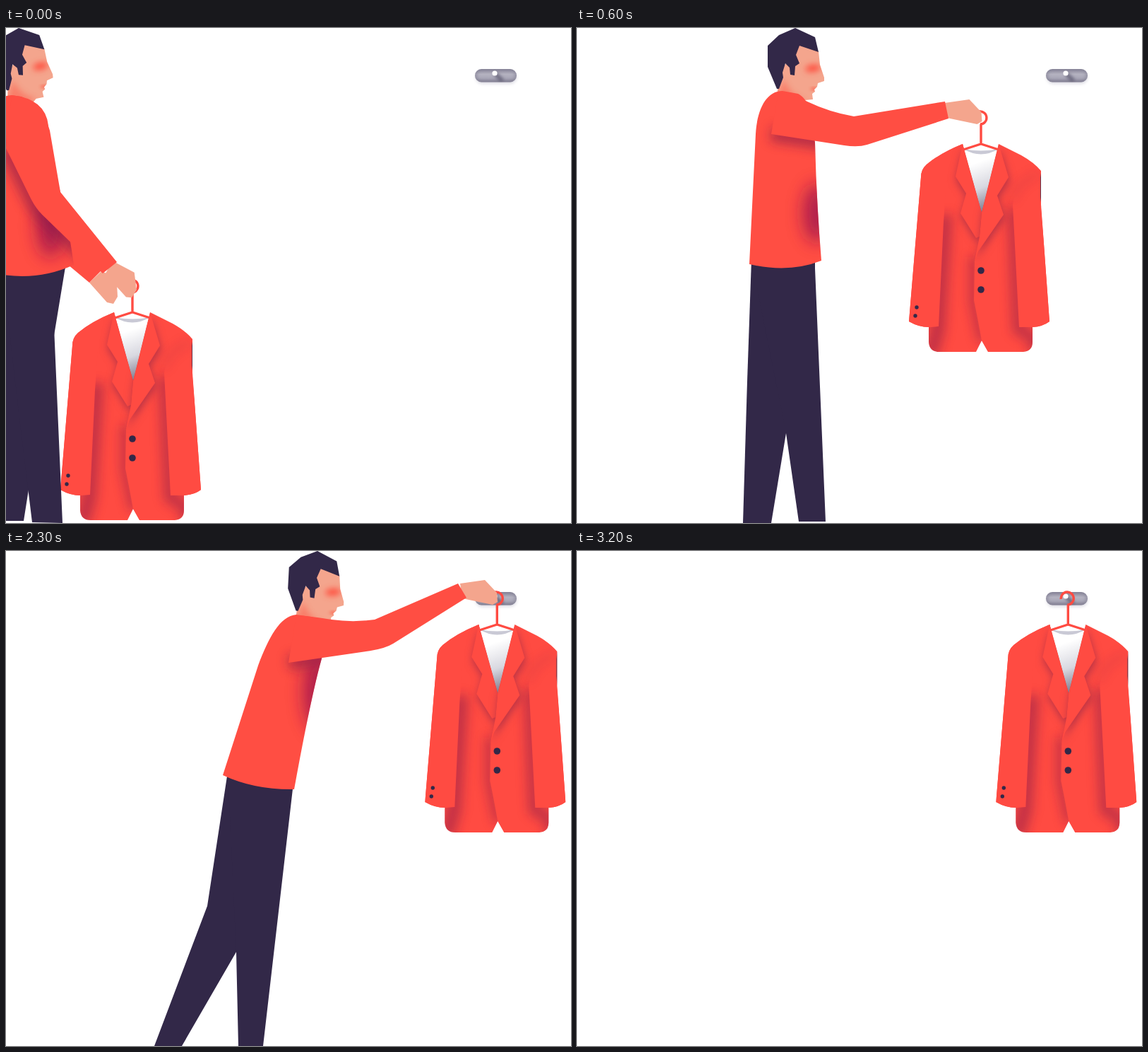
Recreate the animation shown at these times as an HTML page. Size 800 by 700 pixels, loop 5.2 s.

```html
<!DOCTYPE html>
<html lang="en">
<head>
<meta charset="utf-8">
<title>Hanging up a jacket</title>
<style>
  html, body { margin: 0; height: 100%; overflow: hidden; background: #fff; }
  svg { display: block; width: 100vw; height: 100vh; }
  .red { fill: #ff4e43; }
  .coat { fill: #ff4b42; }
  .dark { fill: #322848; }
  .skin { fill: #f4a58d; }
  .shade { fill: none; stroke: #8c1a4a; filter: url(#blur8); }
  .lapel { fill: #ff4b42; filter: drop-shadow(1px 5px 6px #6b1a4a80); }
</style>
</head>
<body>
<svg viewBox="0 0 800 700">
  <defs>
    <filter id="blur2" x="-50%" y="-50%" width="200%" height="200%"><feGaussianBlur stdDeviation="2"/></filter>
    <filter id="blur4" x="-100%" y="-100%" width="300%" height="300%"><feGaussianBlur stdDeviation="4"/></filter>
    <filter id="blur8" filterUnits="userSpaceOnUse" x="-200" y="-100" width="1100" height="900"><feGaussianBlur stdDeviation="8"/></filter>
    <filter id="blur12" x="-100%" y="-100%" width="300%" height="300%"><feGaussianBlur stdDeviation="12"/></filter>
    <linearGradient id="lining" x1="0.35" y1="0" x2="0.55" y2="1">
      <stop offset="0.2" stop-color="#fff"/>
      <stop offset="0.6" stop-color="#d8d8e0"/>
      <stop offset="1" stop-color="#777488"/>
    </linearGradient>
    <linearGradient id="metal" x2="0" y2="1">
      <stop offset="0" stop-color="#8f8c9f"/>
      <stop offset="0.4" stop-color="#b4b2c0"/>
      <stop offset="0.7" stop-color="#aaa8b8"/>
      <stop offset="1" stop-color="#8b889b"/>
    </linearGradient>
    <clipPath id="coatClip"><use href="#coatShape"/></clipPath>
    <clipPath id="torsoClip"><path id="torsoEdge"/></clipPath>
    <clipPath id="faceClip"><use href="#face"/></clipPath>
    <clipPath id="pegClip"><use href="#pegShape"/></clipPath>
  </defs>

  <g id="peg">
    <rect x="665" y="61" width="58" height="18" rx="9" fill="#aaa8bb" opacity=".4" filter="url(#blur2)"/>
    <rect id="pegShape" x="664" y="58" width="59" height="18.5" rx="9.2" fill="url(#metal)"/>
    <g clip-path="url(#pegClip)">
      <rect x="664" y="58" width="59" height="18.5" rx="9.2" fill="none" stroke="#777489" stroke-width="4" opacity=".6" filter="url(#blur2)"/>
      <path d="M693 65l10 10" stroke="#5f5b72" stroke-width="6" opacity=".8" filter="url(#blur2)"/>
    </g>
    <circle cx="692" cy="64" r="3.6" fill="#fff"/>
  </g>

  <g id="jacket">
    <path d="M-25 8Q0 12 25 8L1 99Z" fill="url(#lining)"/>
    <path d="M-25 7Q0 22 25 7Q0 12-25 7Z" fill="#c9c9d5"/>
    <path d="M-25 8L0 0L25 8M0 0V-28H-1A9 9 0 1 0-10-36" fill="none" stroke="#ff4b42" stroke-width="3.4"/>
    <path id="coatShape" class="coat" d="M-26 0Q-58 13-77 29Q-85 36-85 47L-102 251Q-88 259-74 259V280Q-73 294-59 294H-7L1 278L10 294H60Q73 293 73 280V259Q88 258 97 251L85 86V38Q75 26 57 16L25 0L1 97Z"/>
    <g clip-path="url(#coatClip)">
      <path class="shade" d="M-10 160V222L2 280" stroke-width="11" opacity=".6"/>
      <path class="coat" d="M1 97L-2 131L-9 166L-10 221L-5 246L1 278L10 294H24V97Z"/>
      <path class="shade" d="M-51 100L-61 262L-72 300" stroke-width="20" opacity=".55"/>
      <path class="shade" d="M46 90L53 262L76 275V296" stroke-width="16" opacity=".55"/>
      <path class="coat" d="M-20 0L-49 55L-53 110L-60 258L-105 262V0Z"/>
      <path d="M86 35V90L82 60Z" class="dark" opacity=".75"/>
      <path class="coat" d="M84 42Q48 55 45 86L54 259H100V251L84 80Z"/>
      <path class="shade" d="M44 80Q50 55 82 42" stroke-width="6" opacity=".25"/>
      <path class="lapel" d="M-26 0L-36 46L-21 70L-29 98L-7 133L-2 131L1 97Z"/>
      <path class="lapel" d="M25 0L39 47L23 73L32 100L-4 152L-9 166L-2 131L1 97Z"/>
    </g>
    <g class="dark">
      <circle cy="179" r="4.8"/><circle cy="206" r="4.8"/>
      <circle cx="-91" cy="231" r="2.7"/><circle cx="-93" cy="243" r="2.7"/>
    </g>
  </g>

  <g id="man">
    <g id="backArm">
      <path class="skin" d="M38 60L63 88L72 90L78 80L77 62L70 50L55 44Z"/>
      <path class="red" d="M10 0L55 43L38 60L-10 20Z"/>
    </g>
    <path id="legB" class="dark"/>
    <path id="legA" class="dark"/>
    <g id="head">
      <path id="face" class="skin" d="M-20 60L6 22L33 33L35 52L41 70V75L32 78L31 83L27 87L28 90L24 93L25 101L14 102L0 116L-27 104L-24 80Z"/>
      <g clip-path="url(#faceClip)" fill="#ff4e3c">
        <ellipse cx="25" cy="57" rx="11" ry="5" transform="rotate(-8 25 57)" filter="url(#blur4)"/>
        <ellipse cx="27" cy="86" rx="5" ry="2" opacity=".7" filter="url(#blur2)"/>
        <path d="M-16 72Q-8 95 14 102L-5 115L-28 104Z" opacity=".45" filter="url(#blur4)"/>
      </g>
      <path class="dark" d="M0 0L28 13L33 34L6 25L1 38L6 50L0 54L-1 67L-7 66L-8 56L-14 50L-18 63L-17 70L-23 86H-26L-39 55V25L-23 10Z"/>
    </g>
    <path id="torso" class="red"/>
    <g clip-path="url(#torsoClip)">
      <ellipse id="glow" rx="20" fill="#a01450" opacity=".85" filter="url(#blur12)"/>
      <path id="armShade" class="shade" stroke-width="20" opacity=".65"/>
    </g>
    <path id="hand" class="skin" d="M-3-10L32-15L49 3L50 16L43 20L0 11Z"/>
    <path id="arm" class="red"/>
  </g>
</svg>

<script>
const el = id => document.getElementById(id);

// Points are x, y pairs in stage pixels; turn holds the angles of head, hand and back arm.
const arrive = {
  head: [18, 0], turn: [-6, 36, 0], jacket: [179, 402], glow: [63, 280], glowSize: [45],
  torso: [-10,348, -28,160, -28,115, -15,96, 8,95, 22,97, 45,107, 58,130, 62,145, 77,232, 90,290, 96,335, 45,358],
  arm: [8,95, 56,100, 60,138, 77,232, 157,331, 137,347, 42,255, 0,170],
  legA: [-5,345, 20,560, 37,699, 80,700, 67,400, 84,338],
  legB: [-5,345, -12,520, -15,697, 25,697, 31,659, 84,338],
  backArm: [80, 300]
};
const stride = {
  head: [154, 0], turn: [-9, 28, 45], jacket: [379, 312], glow: [224, 245], glowSize: [45],
  torso: [145,345, 123,165, 119,120, 133,95, 160,95, 178,98, 198,108, 207,135, 207,158, 216,200, 235,280, 245,323, 195,347],
  arm: [150,96, 198,102, 205,150, 232,201, 343,233, 340,256, 208,238, 136,148],
  legA: [148,340, 139,416, 43,676, 66,707, 184,504, 235,325],
  legB: [148,340, 184,504, 244,700, 285,700, 235,340, 235,325],
  backArm: [190, 240]
};
const lift = {
  head: [309, 0], turn: [0, 0, 45], jacket: [572, 164], glow: [340, 262], glowSize: [42],
  torso: [244,334, 253,150, 255,115, 268,89, 291,89, 313,93, 325,100, 330,110, 334,140, 337,162, 339,245, 346,329, 300,347],
  arm: [285,92, 305,92, 326,104, 392,125, 521,104, 526,128, 398,169, 275,150],
  legA: [247,328, 296,573, 314,698, 352,698, 337,340, 337,325],
  legB: [247,328, 241,500, 235,700, 275,700, 296,573, 337,325],
  backArm: [290, 220]
};
const reach = {
  head: [441, 0], turn: [3, 0, 45], jacket: [694.5, 104], glow: [441, 200], glowSize: [55],
  torso: [307,317, 357,162, 372,122, 388,92, 411,90, 432,93, 445,96, 450,110, 450,135, 447,152, 432,205, 408,337, 352,338],
  arm: [411,91, 430,92, 461,97, 522,97, 640,46, 652,66, 537,138, 400,158],
  legA: [314,312, 326,567, 329,700, 364,700, 405,345, 407,328],
  legB: [314,312, 285,502, 210,700, 249,700, 326,567, 407,328],
  backArm: [385, 220]
};
const retreat = {
  head: [240, 10], turn: [-2, 38, 45], jacket: [695.3, 104], glow: [260, 282], glowSize: [40],
  torso: [195,353, 188,165, 186,125, 200,104, 226,104, 245,107, 265,115, 271,140, 272,155, 280,242, 289,310, 294,347, 245,367],
  arm: [224,104, 266,110, 269,148, 280,243, 352,350, 333,365, 250,275, 210,155],
  legA: [197,345, 240,623, 253,700, 296,700, 281,375, 282,345],
  legB: [197,345, 196,555, 180,700, 223,700, 240,623, 282,345],
  backArm: [235, 240]
};
const fixed = ['turn', 'jacket', 'glowSize'];
const leave = Object.fromEntries(Object.entries(retreat).map(([part, list]) =>
  [part, fixed.includes(part) ? list : list.map((v, i) => i % 2 ? v : v - 80)]));
const hold = { ...reach, jacket: retreat.jacket };

// Times count steps of 100 ms.
const keys = [
  { at: 0, pose: arrive }, { at: 3, pose: stride }, { at: 6, pose: lift },
  { at: 13, pose: reach, still: true }, { at: 23, pose: hold, still: true },
  { at: 28, pose: retreat }, { at: 32, pose: leave }
];

function slope(k, part, i) {
  if (keys[k].still) return 0;
  const a = keys[Math.max(k - 1, 0)], b = keys[Math.min(k + 1, keys.length - 1)];
  return (b.pose[part][i] - a.pose[part][i]) / (b.at - a.at);
}

// Cubic Hermite between neighbouring poses.
function poseAt(step) {
  let k = 0;
  while (k < keys.length - 2 && step >= keys[k + 1].at) k++;
  const a = keys[k], b = keys[k + 1], span = b.at - a.at;
  const u = Math.min((step - a.at) / span, 1), v = 1 - u;
  const blend = (part, i) =>
    a.pose[part][i] * v * v * (1 + 2 * u) + b.pose[part][i] * u * u * (3 - 2 * u) +
    span * u * v * (slope(k, part, i) * v - slope(k + 1, part, i) * u);
  return Object.fromEntries(Object.keys(a.pose).map(part =>
    [part, a.pose[part].map((_, i) => blend(part, i))]));
}

const mix = (p, q, u) => [p[0] + (q[0] - p[0]) * u, p[1] + (q[1] - p[1]) * u];
const pairs = list => Array.from({ length: list.length / 2 }, (_, i) => list.slice(2 * i, 2 * i + 2));
const trace = (template, list) => {
  let i = 0;
  return template.replace(/@/g, () => `${list[i++].toFixed(2)} ${list[i++].toFixed(2)}`);
};
const place = (id, [x, y], angle = 0) =>
  el(id).setAttribute('transform', `translate(${x} ${y}) rotate(${angle})`);

function drawArm(list, handTurn) {
  const [back, cap, front, elbow, top, bottom, inner, pit] = pairs(list);
  const mid = mix(front, elbow, 0.5);
  const sag = [mid[0] - (elbow[1] - front[1]) * 0.07, mid[1] + (elbow[0] - front[0]) * 0.07];
  const bend = [mix(inner, bottom, 0.1), inner, mix(inner, pit, 0.16)];
  el('arm').setAttribute('d', trace('M@Q@ @Q@ @L@L@L@Q@ @L@Z',
    [back, cap, front, sag, elbow, top, bottom, ...bend, pit].flat()));
  el('armShade').setAttribute('d', trace('M@L@Q@ @L@', [pit, bend[2], inner, bend[0], bottom].flat()));
  place('hand', mix(top, bottom, 0.5), handTurn);
}

function draw(step) {
  const p = poseAt(step);
  place('jacket', step < 23 ? p.jacket : retreat.jacket);
  el('man').setAttribute('opacity', Math.max(0, Math.min(1, (32 - step) / 5)));

  const torso = trace('M@L@C@ @ @L@C@ @ @L@Q@ @Q@ @Z', [...p.torso, p.torso[0], p.torso[1]]);
  el('torso').setAttribute('d', torso);
  el('torsoEdge').setAttribute('d', torso);
  for (const leg of ['legA', 'legB']) el(leg).setAttribute('d', trace('M@L@L@L@L@L@Z', p[leg]));
  drawArm(p.arm, p.turn[1]);
  place('head', p.head, p.turn[0]);
  place('backArm', p.backArm, p.turn[2]);
  place('glow', p.glow);
  el('glow').setAttribute('ry', p.glowSize[0]);
}

let shown = -1;
function tick() {
  let step = Math.floor(performance.now() % 5200 / 100);
  if (step > 13 && step < 23) step = 13;
  step = Math.min(step, 32);
  if (step !== shown) draw(shown = step);
  requestAnimationFrame(tick);
}
tick();
</script>
</body>
</html>
```
